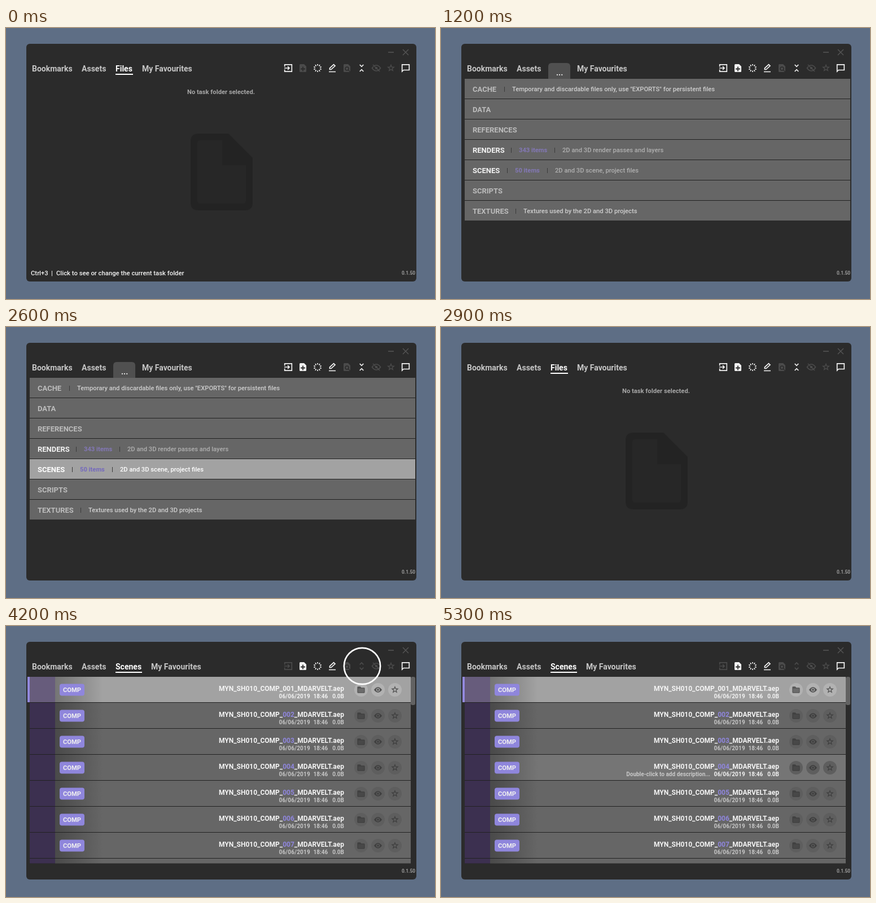
Animation of 760 by 480 pixels, one loop 5.4 s. Source, as an HTML page:

```html
<!DOCTYPE html>
<html lang="en">
<head>
<meta charset="utf-8">
<title>Task folder browser</title>
<style>
  html, body { margin: 0; width: 100%; height: 100%; overflow: hidden; background: #5e6e85; }
  svg { display: block; width: 760px; height: 480px; font-family: Roboto, sans-serif; font-weight: 700; }
  .medium { font-weight: 500; }
  .end { text-anchor: end; }
  .small { letter-spacing: .2px; }
  .line { fill: none; stroke: currentColor; stroke-width: 1.7; }
  .menu { animation: menu 5.4s linear infinite; }
  .ring {
    fill: none; stroke: #fff; stroke-width: 2.6; opacity: 0;
    animation: grow 5.4s infinite, fade 5.4s linear infinite;
  }
  .second { animation-delay: 3.8s; }
  @keyframes menu {
    0%, 3.7% { opacity: 0; }
    8.3%, 51% { opacity: 1; }
    53.6%, 100% { opacity: 0; }
  }
  @keyframes grow {
    0%, 3.7% { r: 0px; animation-timing-function: cubic-bezier(.215, .61, .355, 1); }
    22.2%, 100% { r: 63px; }
  }
  @keyframes fade {
    0%, 3.65% { opacity: 0; }
    3.75%, 15% { opacity: 1; }
    22%, 100% { opacity: 0; }
  }
</style>
</head>
<body>
<script>
const LOOP = 5400;
const WHITE = '#f4f4f4', DIM = '#4b4b4b', VIOLET = '#8f86dc';
let rules = '', count = 0;

// Makes content visible between two times of the loop.
function show(from, to, body) {
  const at = t => Math.max(0, (t - 4) / LOOP * 100).toFixed(3) + '%';
  const name = 'show' + count++;
  rules += `@keyframes ${name}{0%{visibility:hidden}${at(from)}{visibility:visible}` +
    (to < LOOP ? `${at(to)},100%{visibility:hidden}` : '100%{visibility:visible}') + '}';
  return `<g style="animation:${name} ${LOOP}ms step-end infinite">${body}</g>`;
}

const text = (x, y, size, fill, s, cls = '') =>
  `<text x="${x}" y="${y}" font-size="${size}" fill="${fill}" class="${cls}">${s}</text>`;
const rect = (x, y, w, h, fill, r = 0) =>
  `<rect x="${x}" y="${y}" width="${w}" height="${h}" rx="${r}" fill="${fill}"/>`;
const line = d => `<path class="line" d="${d}"/>`;
const solid = (d, fill = 'currentColor') => `<path d="${d}" fill="${fill}" fill-rule="evenodd"/>`;
const icon = (x, y, color, body, scale = 1) =>
  `<g transform="translate(${x} ${y}) scale(${scale})" color="${color}">${body}</g>`;

function starPath(outer, inner) {
  let d = '';
  for (let i = 0; i < 10; i++) {
    const a = i * Math.PI / 5, r = i % 2 ? inner : outer;
    d += `${i ? 'L' : 'M'}${(r * Math.sin(a)).toFixed(2)} ${(-r * Math.cos(a)).toFixed(2)}`;
  }
  return d + 'Z';
}

function rays() {
  let d = '';
  for (let i = 0; i < 10; i++) {
    const a = i * Math.PI / 5, c = Math.cos(a), s = Math.sin(a);
    d += `M${4.4 * s} ${-4.4 * c}L${7 * s} ${-7 * c}`;
  }
  return line(d);
}

const PAGE = 'M-4.5-7H2L6-3V5.500Q6 7 4.500 7H-4.500Q-6 7-6 5.500V-5.500Q-6-7-4.500-7Z';
const EYE = 'M-7.500 0Q-4-5 0-5T7.500 0Q4 5 0 5T-7.500 0Z';
const glyph = {
  enter: line('M-6.300-2.500V-6.200H6.300V6.200H-6.300V2.500M-7 0H2M-1-3L2 0L-1 3'),
  add: solid(PAGE + 'M-.900-2.500V.600H-4V2.400H-.900V5.500H.900V2.400H4V.600H.900V-2.500Z'),
  busy: rays(),
  edit: line('M-6 6.500H6M-4.500 2.500V.200L2.500-6.300L5-4L-2 2.500Z'),
  find: solid(PAGE) + '<circle cx="0" cy="1" r="3" fill="none" stroke="#2b2b2b" stroke-width="1.500"/>' +
    '<path d="M2 3L6 7" stroke="#2b2b2b" stroke-width="1.500"/>',
  fold: line('M-3.300-6L0-2.700L3.300-6M-3.300 6L0 2.700L3.300 6'),
  unfold: line('M-3.300-2.700L0-6L3.300-2.700M-3.300 2.700L0 6L3.300 2.700'),
  hidden: line(EYE + 'M-6-6L6 6') + '<circle r="2.200" fill="currentColor"/>',
  star: solid(starPath(7.5, 3.2) + starPath(3.6, 1.6)),
  chat: line('M-6.300 6V-6.100H6.300V3.500H-3.800Z'),
  folder: solid('M-7-4.500Q-7-6-5.500-6H-1.500L.500-4H5.500Q7-4 7-2.500V4.500Q7 6 5.500 6H-5.500Q-7 6-7 4.500Z' +
    'M-5.500-2.500V4.500H5.500V-2.500Z') + '<path d="M-6-3H6V5H-6Z" fill="currentColor" opacity=".75"/>',
  eye: solid(EYE + 'M-3.200 0A3.200 3.200 0 0 0 3.200 0A3.200 3.200 0 0 0-3.200 0Z') +
    '<circle r="2" fill="currentColor"/>'
};

const tool = (x, name, color = WHITE) => icon(x, 71, color, glyph[name]);

function toolbar() {
  return show(0, 3000, tool(500, 'enter')) + show(3000, LOOP, tool(500, 'enter', DIM)) +
    show(0, 300, tool(526, 'add', DIM)) + show(300, LOOP, tool(526, 'add')) +
    tool(552, 'busy') + tool(578, 'edit') + tool(604, 'find', DIM) +
    show(0, 4100, tool(630, 'fold')) + show(4100, LOOP, tool(630, 'unfold', DIM)) +
    tool(656, 'hidden', DIM) + tool(682, 'star', DIM) + tool(708, 'chat');
}

const tabs = (active, width, next) =>
  text(194, 77, 14, '#fff', active) + rect(194, 81, width, 2, '#fff') +
  text(next, 77, 14, '#c6c6c6', 'My Favourites');

function emptyPage() {
  return text(381, 117, 11.2, '#a6a6a6', 'No task folder selected.', 'mid') +
    solid('M341 187H394L437 230V309Q437 323 423 323H341Q327 323 327 309V201Q327 187 341 187Z', '#232323') +
    solid('M344 199H383V243H425V306Q425 311 420 311H344Q339 311 339 306V204Q339 199 344 199Z', '#272727');
}

// Task folder menu: name, item count, description, x of each part.
const folders = [
  ['CACHE', '', 'Temporary and discardable files only, use "EXPORTS" for persistent files', 112, 126],
  ['DATA'],
  ['REFERENCES'],
  ['RENDERS', '343 items', '2D and 3D render passes and layers', 124, 138, 201, 215],
  ['SCENES', '50 items', '2D and 3D scene, project files', 117, 131, 188, 202],
  ['SCRIPTS'],
  ['TEXTURES', '', 'Textures used by the 2D and 3D projects', 132, 146]
];

function folderRow(i, lit) {
  const [name, items, note, bar, a, bar2, b] = folders[i];
  const y = 90 + 36 * i, base = y + 22;
  const tick = x => rect(x, y + 14, 1, 9, '#3a3a3a');
  let s = rect(42, y, 683, 35, lit ? '#a2a2a2' : '#666') +
    text(56, base + .8, 13, lit ? '#fff' : items ? '#f2f2f2' : '#bcbcbc', name);
  if (note) s += tick(bar);
  if (items) s += text(a, base, 11.2, lit ? '#7469bd' : '#8378b6', items) + tick(bar2);
  if (note) s += text(b || a, base, 11.2, lit ? '#fff' : items ? '#b0b0b0' : '#cfcfcf', note, 'medium');
  return s;
}

function folderMenu() {
  const hovers = [[0, 1800, 2000], [1, 2000, 2300], [2, 2300, 2400], [3, 2400, 2500], [4, 2500, 2950]];
  return '<path d="M190 90V68Q190 62 196 62H223Q229 62 229 68V90Z" fill="#505050"/>' +
    text(204, 84, 14, '#e8e8e8', '...') + rect(42, 90, 683, 251, '#222') +
    folders.map((f, i) => folderRow(i)).join('') +
    hovers.map(([i, from, to]) => show(from, to, folderRow(i, true))).join('');
}

function tag(x, y, w, label, fill) {
  return rect(x, y, w, 21, fill, 4) + text(x + 6, y + 14.6, 11.2, '#efefef', label);
}

// One file row; the list ends at `edge`, its first row is the selected one.
function fileRow(i, edge, file, hover) {
  const y = 90 + 46 * i, right = edge - 118, top = i === 0;
  const fill = top ? '#a2a2a2' : hover ? '#757575' : '#666';
  const soft = top || hover ? '#f2f2f2' : '#c6c6c6';
  const base = y + 37.5;
  let s = rect(42, y, 45, 45, top ? '#675c7c' : '#3c3050') +
    rect(87, y, edge - 87, 45, fill) + rect(87, y, 85, 45, 'url(#shade)') +
    (top ? rect(38, y, 4, 45, '#9289dd') : '');
  s += file.place
    ? tag(95, y + 12.5, 54, 'LAYOUT', VIOLET) + tag(152, y + 12.5, file.place[0] === 'B' ? 86 : 84, file.place, '#464646')
    : tag(95, y + 12.5, 44, 'COMP', VIOLET);
  const color = top && !file.group ? WHITE : VIOLET;
  s += text(right, y + 25, 12, WHITE,
    `MYN_SH010_${file.place || 'COMP'}_<tspan fill="${color}">${file.range}</tspan>_${file.user}.aep`, 'end');
  s += text(right - 115.5, base, 10, soft, '06/06/2019', 'small') +
    text(right - 54.5, base, 10, soft, '18:46') + text(right, base, 10, soft, '0.0B', 'end');
  if (file.group) s += text(right - 167, base, 10, soft, '10 files') + text(right - 125, base, 10, soft, '|');
  else if (hover) s += text(right - 122, base, 10, '#c8c8c8', 'Double-click to add description...', 'end');
  ['folder', 'eye', 'star'].forEach((name, k) => {
    const x = edge - 88 + 30 * k;
    s += `<circle cx="${x}" cy="${y + 23}" r="12" fill="${top ? '#b2b2b2' : '#5e5e5e'}"/>` +
      icon(x, y + 23, top ? '#555' : '#404040', glyph[name], .95);
  });
  return s;
}

function fileList(files, edge, height, hovers) {
  return rect(42, 90, edge - 42, height, '#222') +
    files.map((f, i) => fileRow(i, edge, f)).join('') +
    hovers.map(([i, from, to]) => show(from, to, fileRow(i, edge, files[i], true))).join('');
}

const users = ['MDARVELT', 'VODH'];
const group = (place, range, user) => ({ place, range: `[${range}]`, user: users[user], group: true });
const groups = [
  group('', '001-010', 0),
  group('BACKGROUND', '011-020', 1), group('BACKGROUND', '001-010', 0),
  group('FOREGROUND', '011-020', 1), group('FOREGROUND', '001-010', 0)
];
const shots = Array.from({ length: 8 }, (_, i) => ({ range: '00' + (i + 1), user: users[0] }));
const path = [1, 2, 3, 4, 5, 6, 5, 3].map((row, i) => [row, 4600 + 100 * i, 4700 + 100 * i]);

const scene = `
  <defs>
    <linearGradient id="shade">
      <stop stop-color="#000" stop-opacity=".28"/><stop offset="1" stop-color="#000" stop-opacity="0"/>
    </linearGradient>
    <clipPath id="view"><rect x="36" y="90" width="691" height="330.500"/></clipPath>
  </defs>` +
  rect(0, 0, 760, 480, '#5e6e85') + rect(36, 28, 691, 421, '#2b2b2b', 6) +
  '<path d="M677 43H687M703 38L713 48M713 38L703 48" stroke="#555" stroke-width="1.400"/>' +
  text(46, 77, 14, '#c6c6c6', 'Bookmarks') + text(134, 77, 14, '#c6c6c6', 'Assets') +
  show(0, 3000, tabs('Files', 31, 241) + emptyPage()) +
  show(3000, LOOP, tabs('Scenes', 47, 257)) +
  toolbar() +
  show(0, 300, text(44, 438, 11.3, WHITE, 'Ctrl+3', 'medium') + text(80, 438, 11.3, WHITE, '|', 'medium') +
    text(89, 438, 11.3, WHITE, 'Click to see or change the current task folder', 'medium')) +
  text(725, 437, 8.4, '#9c9c9c', '0.1.50', 'end') +
  `<g class="menu">${folderMenu()}</g>` +
  show(3000, 4100, fileList(groups, 725, 229, [[3, 3300, 3400], [2, 3400, 3500], [1, 3500, 3600]])) +
  show(4100, LOOP, `<g clip-path="url(#view)">${fileList(shots, 717, 331, path)}</g>` +
    rect(717, 90, 8, 50, '#626262', 3)) +
  '<circle class="ring" cx="211" cy="75"/><circle class="ring second" cx="631" cy="71"/>';

const style = document.createElement('style');
style.textContent = '.mid{text-anchor:middle}' + rules;
document.head.append(style);
document.body.innerHTML = `<svg viewBox="0 0 760 480">${scene}</svg>`;
</script>
</body>
</html>
```
